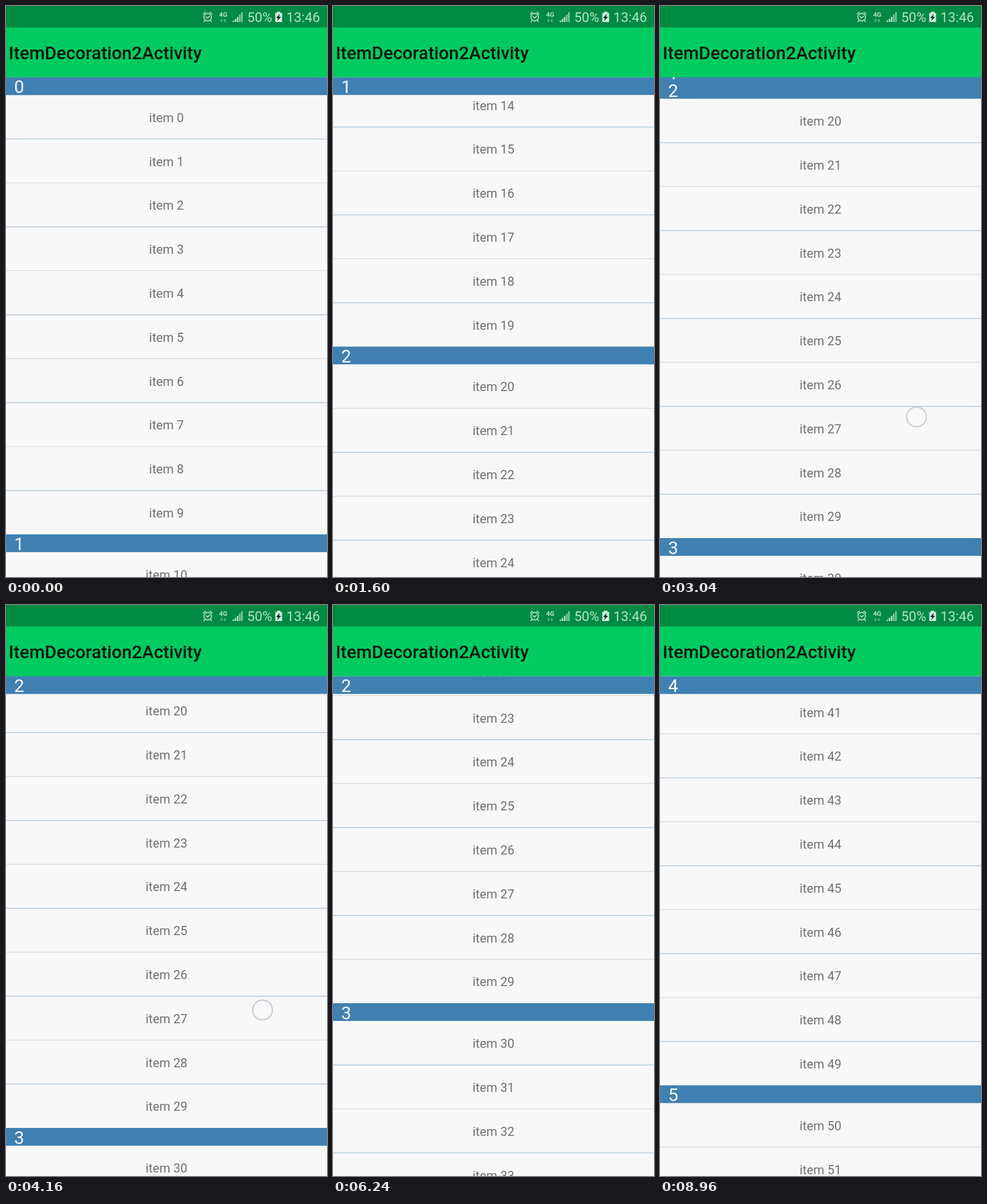
An HTML page that plays this animation: 561 px wide and 998 px high, repeating every 9.12 s.

```html
<!DOCTYPE html>
<html lang="en">
<head>
<meta charset="utf-8">
<title>Sticky section list</title>
<style>
  html, body { margin: 0; width: 100%; height: 100%; overflow: hidden; background: #f8f8f8; }
  svg { display: block; width: 561px; height: 998px; font-family: Roboto, sans-serif; }
  .item { font-size: 21.8px; fill: #707070; text-anchor: middle; }
  .digit { font-size: 31.2px; fill: #f6fafc; }
  .title { font-size: 31.2px; font-weight: 500; fill: #03160b; }
  .status { font-size: 23.6px; fill: #b4e2c6; }
</style>
</head>
<body>
<svg viewBox="0 0 561 998">
  <rect width="561" height="998" fill="#f8f8f8"/>
  <g id="list"></g>
  <g id="sticky"></g>

  <rect y="37" width="561" height="87.5" fill="#00cb61"/>
  <rect width="561" height="37.5" fill="#008a41"/>
  <text class="title" x="4.8" y="93">ItemDecoration2Activity</text>

  <g fill="none" stroke="#b4e2c6" stroke-width="1.7" stroke-linecap="round">
    <circle cx="352.5" cy="19.5" r="6.6"/>
    <path d="M345 14.2a10 10 0 0 1 3.6-3.4M360 14.2a10 10 0 0 0-3.6-3.4M347.6 25.2l-1.8 2.2M357.4 25.2l1.8 2.2M349.6 18.6l2.6 2.4 3.6-3.2"/>
  </g>
  <text x="372.5" y="19.3" font-size="11.5" font-weight="700" fill="#b4e2c6">4G</text>
  <g fill="#5cb585">
    <path d="M375.5 22.5h2v3h1.5l-2.5 3-2.5-3h1.5zM381.5 28.5h2v-3h1.5l-2.5-3-2.5 3h1.5z"/>
  </g>
  <g fill="#b4e2c6">
    <path d="M396 25.5h2.6v2.5h-2.6zM399.8 22.5h2.6v5.5h-2.6zM403.6 19h2.6v9h-2.6z"/>
    <path d="M407.4 15h2.6v13h-2.6zM411 11h2.6v17h-2.6z" opacity=".75"/>
  </g>
  <text class="status" x="421.5" y="28">50%</text>
  <path d="M473.5 10h6v2.2h3v15.8h-12v-15.8h3z" fill="#d3eedd"/>
  <path d="M478.6 13.5l-6.4 7.6h3.4l-1.6 5.2 6.8-7.4h-3.6z" fill="#06301a"/>
  <text class="status" x="490" y="28">13:46</text>

  <circle id="touch" cx="448.3" r="17.2" fill="#fbfbfd" fill-opacity=".5" stroke="#c8cbd5" stroke-width="2.2"/>
</svg>
<script>
const LOOP = 9120, STEP = 160;
const TOP = 124.5, HEAD = 31, ROW = 76.8, SECTION = HEAD + 10 * ROW;
const SECTIONS = 6;

// time, scroll offset, parity of the tinted dividers
const keys = [
  [0, 0, 0], [1600, 1127.2, 1], [3040, 1591.5, 0], [4160, 1607.5, 0],
  [6240, 1825.5, 1], [7680, 3067.5, 1], [8960, 3280, 0]
];
const TOUCH_FROM = 2720, TOUCH_TO = 4480;

const $ = id => document.getElementById(id);
const list = $('list'), sticky = $('sticky'), touch = $('touch');

function add(parent, tag, attrs, text = '') {
  const el = document.createElementNS('http://www.w3.org/2000/svg', tag);
  for (const k in attrs) el.setAttribute(k, attrs[k]);
  el.textContent = text;
  return parent.appendChild(el);
}

function addHeader(parent, y, label) {
  add(parent, 'rect', { y, width: 561, height: HEAD, fill: '#4080b2' });
  return add(parent, 'text', { class: 'digit', x: 14.3, y: y + 27.7 }, label);
}

const lines = [];
for (let s = 0; s < SECTIONS; s++) {
  const y = TOP + s * SECTION;
  for (let i = 0; i < 10; i++) {
    const top = y + HEAD + i * ROW;
    add(list, 'text', { class: 'item', x: 280.5, y: top + 47.2 }, `item ${s * 10 + i}`);
    if (i < 9) {
      const el = add(list, 'rect', { y: top + ROW - 0.5, width: 561 });
      lines.push({ el, parity: (s + i) % 2 });
    }
  }
  addHeader(list, y, s);
}
const stickyDigit = addHeader(sticky, TOP, 0);

// monotone cubic slopes, at rest at both ends
const pace = i => (keys[i + 1][1] - keys[i][1]) / (keys[i + 1][0] - keys[i][0]);
const slopes = keys.map((_, i) => {
  if (i === 0 || i === keys.length - 1) return 0;
  const a = pace(i - 1), b = pace(i);
  return 2 * a * b / (a + b);
});

function segment(t) {
  let i = 0;
  while (i < keys.length - 1 && keys[i + 1][0] <= t) i++;
  return i;
}

function scrollAt(t) {
  const i = segment(t);
  if (i === keys.length - 1) return keys[i][1];
  const [t0, y0] = keys[i], [t1, y1] = keys[i + 1];
  const d = t1 - t0, u = (t - t0) / d, v = 1 - u;
  return y0 * v * v * (1 + 2 * u) + y1 * u * u * (3 - 2 * u)
    + d * u * v * (slopes[i] * v - slopes[i + 1] * u);
}

function draw(t) {
  const y = scrollAt(t), parity = keys[segment(t)][2];
  list.setAttribute('transform', `translate(0 ${-y})`);
  for (const { el, parity: p } of lines) {
    const tinted = p === parity;
    el.setAttribute('height', tinted ? 1.4 : 1);
    el.setAttribute('fill', tinted ? '#aec8d8' : '#d0d2d3');
  }

  const section = Math.floor(y / SECTION);
  const push = Math.min(0, (section + 1) * SECTION - y - HEAD);
  stickyDigit.textContent = section;
  sticky.setAttribute('transform', `translate(0 ${push})`);

  const held = t >= TOUCH_FROM && t <= TOUCH_TO;
  touch.setAttribute('visibility', held ? 'visible' : 'hidden');
  const drag = y - 1591.5;
  touch.setAttribute('cy', 718 - drag * (drag > 0 ? 0.63 : 1));
}

const start = performance.now();
function tick() {
  const t = (performance.now() - start) % LOOP;
  draw(Math.floor(t / STEP) * STEP);
  requestAnimationFrame(tick);
}
tick();
</script>
</body>
</html>
```
